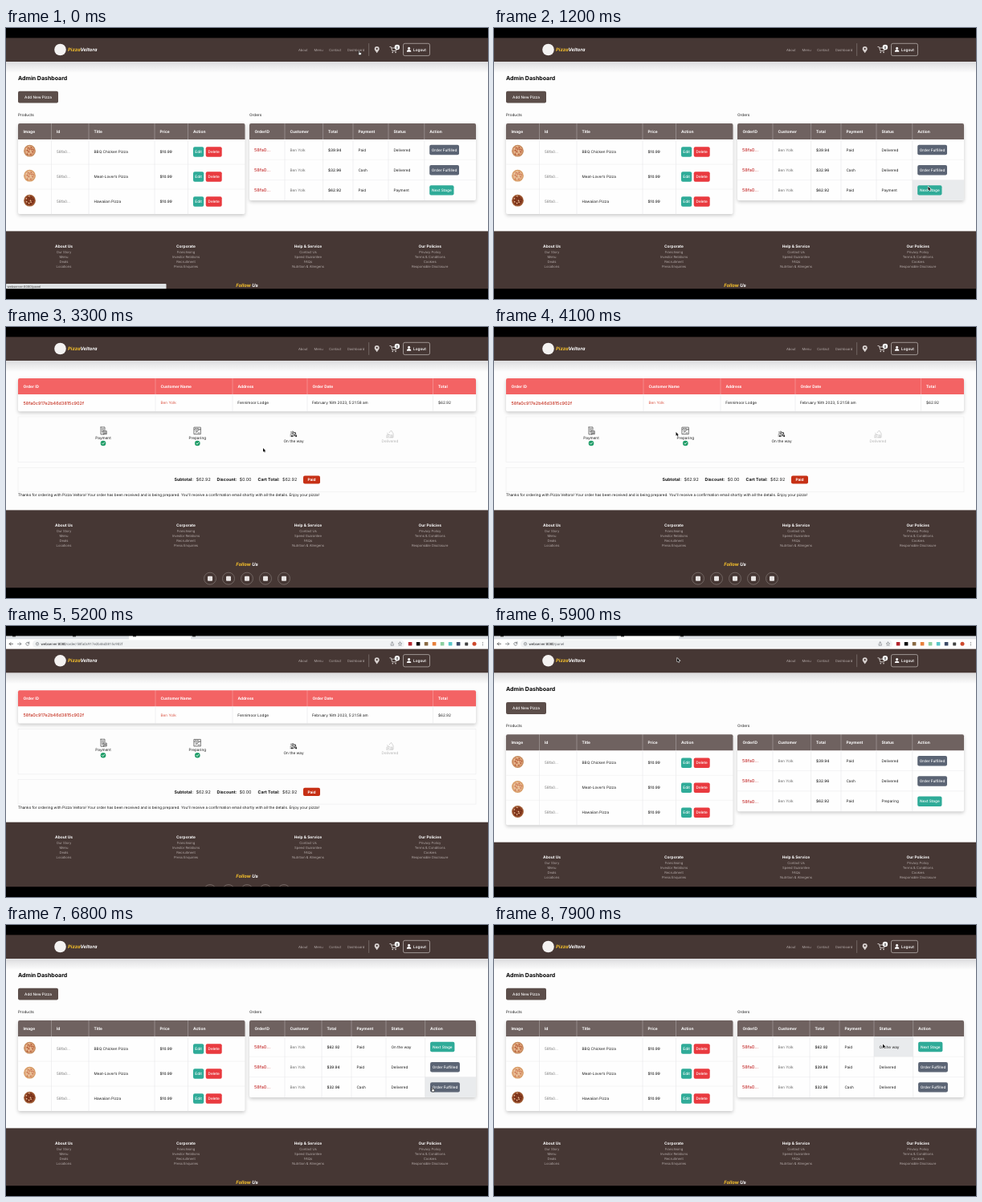
An HTML page that plays this animation: 600 px wide and 338 px high, repeating every 8 s.

```html
<!DOCTYPE html>
<html lang="en">
<head>
<meta charset="utf-8">
<title>Pizza admin</title>
<style>
  html, body { margin: 0; width: 100%; height: 100%; overflow: hidden; background: #000; }
  svg { display: block; width: 100vw; height: 100vh; font-family: Inter, sans-serif; text-rendering: geometricPrecision; }
  text { white-space: pre; }
  .shadow { filter: drop-shadow(0 2px 2px #0003); }
</style>
</head>
<body>
<svg id="stage" viewBox="0 0 600 338"></svg>
<script>
const LOOP = 8000, BAR = 16.3;
const BROWN = '#463734', GREEN = '#2fab98', RED = '#e93a3f', SLATE = '#5b6474', INK = '#1c1c1c';
const HOST = 'webserver:8080', TICKET = '58fa0c917e2b46d3815c902f', SHORT_ID = TICKET.slice(0, 5) + '...';
const GUEST = 'Ben Yolk';

const stage = document.getElementById('stage');

// Drawing helpers; text is placed by its vertical centre.
const text = (x, y, s, size = 4.7, fill = INK, weight = 400, anchor = 'start', extra = '') =>
  `<text x="${x}" y="${y + size * .36}" font-size="${size}" fill="${fill}" font-weight="${weight}" text-anchor="${anchor}" ${extra}>${s}</text>`;
const box = (x, y, w, h, fill, r = 0, extra = '') =>
  `<rect x="${x}" y="${y}" width="${w}" height="${h}" fill="${fill}" rx="${r}" ${extra}/>`;
const dot = (x, y, r, fill, extra = '') => `<circle cx="${x}" cy="${y}" r="${r}" fill="${fill}" ${extra}/>`;
const line = (d, color, width = .5, fill = 'none') =>
  `<path d="${d}" fill="${fill}" stroke="${color}" stroke-width="${width}" stroke-linecap="round" stroke-linejoin="round"/>`;
const move = (x, y, body, extra = '') => `<g transform="translate(${x} ${y})" ${extra}>${body}</g>`;
const button = (x, y, w, label, fill) =>
  box(x, y - 6.2, w, 12.4, fill, 2) + text(x + w / 2, y, label, 4.7, '#fff', 500, 'middle');

// Motion helpers
const ramp = (t, a, b) => {
  const u = Math.min(1, Math.max(0, (t - a) / (b - a)));
  return u * u * (3 - 2 * u);
};
const route = [
  [0, 439.6, 28.3], [200, 440, 30], [900, 548, 105], [1250, 540, 203], [1650, 538, 203], [2350, 509, 153],
  [2600, 509, 153], [2950, 322, 151], [3300, 320, 151], [3950, 226.5, 131], [4200, 226.5, 131],
  [4650, 228, 5], [5550, 228, 5], [5850, 228, 40], [6000, 228, 40], [6500, 530.6, 202.5],
  [7000, 530.6, 202.5], [7250, 511, 198], [7750, 484, 148.5], [LOOP, 484, 148.5]
];
function pointer(t) {
  const i = route.findIndex(k => k[0] > t);
  const [t0, x0, y0] = route[i - 1], [t1, x1, y1] = route[i];
  const u = ramp(t, t0, t1);
  return [x0 + (x1 - x0) * u, y0 + (y1 - y0) * u];
}

function header() {
  const nav = [[364, 'About'], [383.5, 'Menu'], [402, 'Contact'], [425, 'Dashboard']];
  return box(0, 42, 600, 14, 'url(#fade)') + box(0, 12, 600, 30, BROWN) +
    dot(67.5, 27, 7.3, '#f4f2f1') +
    text(77, 27, '<tspan fill="#f6c02c">Pizza</tspan>Veltora', 5.9, '#fff', 700, 'start', 'font-style="italic"') +
    nav.map(([x, s]) => text(x, 27, s, 4.2, '#d2cac8', 300)).join('') +
    line('M451.7 19.5V34.5', '#8f8582', .6) +
    '<path d="M461.7 31.3C459 27.5 458.7 27 458.7 25.9a3 3 0 0 1 6 0C464.7 27 464.4 27.5 461.7 31.3Z" fill="#d8d2d0"/>' +
    dot(461.7, 25.9, 1.1, BROWN) +
    line('M477.8 23.5h1.5l1.5 5h4.7l1-3.6h-6.4', '#e5e0de', .8) + dot(481.3, 30.4, .8, '#e5e0de') + dot(485, 30.4, .8, '#e5e0de') +
    dot(486.9, 24, 3.2, '#fff') + text(486.9, 24, '0', 4.3, '#222', 600, 'middle') +
    box(494.5, 19.3, 33, 15.3, 'none', 2, 'stroke="#d9d3d1" stroke-width=".6"') +
    dot(501.6, 25.2, 1.5, '#fff') + '<path d="M498.9 29.8a2.7 2.7 0 0 1 5.4 0Z" fill="#fff"/>' +
    text(507, 27, 'Logout', 4.7, '#fff', 600);
}

function footer(top) {
  const columns = [
    [72, 'About Us', 'Our Story', 'Menu', 'Deals', 'Locations'],
    [224, 'Corporate', 'Franchising', 'Investor Relations', 'Recruitment', 'Press Enquiries'],
    [376, 'Help &amp; Service', 'Contact Us', 'Speed Guarantee', 'FAQs', 'Nutrition &amp; Allergens'],
    [527.7, 'Our Policies', 'Privacy Policy', 'Terms &amp; Conditions', 'Cookies', 'Responsible Disclosure']
  ];
  const lists = columns.map(([x, title, ...items]) =>
    text(x, 18.7, title, 4.85, '#fff', 700, 'middle') +
    items.map((s, i) => text(x, 25.6 + 6.2 * i, s, 4.2, '#d2cac8', 300, 'middle')).join('')).join('');
  const social = [254, 277, 300, 323, 346].map(x =>
    dot(x, 85.3, 7.5, 'none', 'stroke="#8d8380" stroke-width=".6"') + box(x - 3, 82.3, 6, 6, '#e8e4e3', 1)).join('');
  return move(0, top, box(0, 0, 600, 120, BROWN) + lists +
    text(300, 67, '<tspan fill="#f6c02c">Follow</tspan> Us', 5.9, '#fff', 700, 'middle', 'font-style="italic"') + social);
}

// Table frame: edges lists every column border from left to right.
function grid(edges, top, head, rows, rowH, color, titles, hover) {
  const left = edges[0], right = edges[edges.length - 1], bottom = top + head + rows * rowH;
  let out = box(left, top, right - left, bottom - top, '#fefefe', 2, 'class="shadow"') +
    `<path d="M${left} ${top + head}V${top + 2}q0-2 2-2H${right - 2}q2 0 2 2V${top + head}Z" fill="${color}"/>`;
  if (hover) {
    const c = edges.findIndex((x, i) => hover[0] >= x && hover[0] < edges[i + 1]);
    const r = Math.floor((hover[1] - top - head) / rowH);
    if (c >= 0 && r >= 0 && r < rows) out += box(edges[c], top + head + r * rowH, edges[c + 1] - edges[c], rowH, '#e9ebed');
  }
  for (let r = 1; r < rows; r++) out += line(`M${left} ${top + head + r * rowH}H${right}`, '#e4e4e6', .4);
  edges.slice(1, -1).forEach(x => {
    out += line(`M${x} ${top}V${top + head}`, '#ffffff80', .5) + line(`M${x} ${top + head}V${bottom}`, '#e2e2e4', .5);
  });
  return out + titles.map((s, i) => text(edges[i] + 6.4, top + head / 2, s, 4.9, '#fff', 700)).join('');
}

function pizza(x, y, crust, sauce, topping) {
  let out = dot(x, y, 7.4, crust) + dot(x, y, 6.2, sauce);
  for (let i = 0; i < 16; i++) {
    const r = 5.5 * Math.sqrt((i + .5) / 16), a = i * 2.4;
    out += dot(x + r * Math.cos(a), y + r * Math.sin(a), .75, i % 3 ? topping : '#f0d3ae');
  }
  return out;
}

function products(mouse) {
  const edges = [15, 56.5, 103, 185, 226.5, 297.5];
  const items = [
    ['BBQ Chicken Pizza', '#c48a5c', '#d99a70', '#a5482c'],
    ['Meat-Lover’s Pizza', '#d79a62', '#e2ad83', '#c4684a'],
    ['Hawaiian Pizza', '#a3623a', '#8c3f22', '#5f2413']
  ];
  return grid(edges, 119, 20, 3, 31, '#6f6260', ['Image', 'Id', 'Title', 'Price', 'Action'], mouse) +
    items.map(([name, ...tones], i) => {
      const y = 154.5 + 31 * i;
      return pizza(29.5, y - 1.3, ...tones) + text(63, y, SHORT_ID, 4.7, '#777') + text(109.5, y, name) +
        text(191.5, y, '$10.99', 4.7, INK, 500) + button(233, y, 13.2, 'Edit', GREEN) + button(248.7, y, 20, 'Delete', RED);
    }).join('');
}

function orders(t, mouse) {
  const onWay = t >= 6600;
  const edges = onWay ? [303, 347, 393, 430, 473, 521.7, 585] : [303, 347, 394.6, 432, 476, 520.8, 585];
  const done = [['$39.94', 'Paid', 'Delivered'], ['$32.96', 'Cash', 'Delivered']];
  const open = ['$62.92', 'Paid', onWay ? 'On the way' : t < 1500 ? 'Payment' : 'Preparing'];
  const moved = onWay || t >= 1500 && t < 5000;
  const list = moved ? [open, ...done] : [...done, open];
  return grid(edges, 119, 20, 3, 25.3, '#6f6260', ['OrderID', 'Customer', 'Total', 'Payment', 'Status', 'Action'], mouse) +
    list.map((order, i) => {
      const y = 152 + 25.2 * i, x = edges.map(e => e + 6.4);
      return text(309, y, SHORT_ID, 5.47, '#c53030', 500) + text(x[1], y, GUEST, 4.7, '#6d6d6d') +
        order.map((s, c) => text(x[c + 2], y, s, 4.7, INK, c ? 400 : 500)).join('') +
        (order === open ? button(x[5], y, 30.3, 'Next Stage', GREEN) : button(x[5], y, 36.8, 'Order Fulfilled', SLATE));
    }).join('');
}

const adminPage = (t, mouse) =>
  text(15, 62.4, 'Admin Dashboard', 7.03, '#000', 700) +
  box(15, 78.8, 50, 14.8, '#5c4e4a', 2) + text(40, 86.2, 'Add New Pizza', 4.7, '#fff', 500, 'middle') +
  text(15, 108.5, 'Products') + text(303, 108.5, 'Orders') +
  products(mouse) + orders(t, mouse) + footer(253.4);

const check = x => dot(x, 145, 3.3, '#1f9d68') + line(`M${x - 1.5} 145l1.1 1.2 2-2.3`, '#fff', .8);

function stages() {
  const bill = 'M-3-4.5h5v3.5M-3-4.5v9h4M-1.7-2.5h2.5M-1.7-.6h2.5M-1.7 1.3h1.5M.5.3h3.7v4H.5ZM1.4 1.6h2M1.4 3h2';
  const cook = 'M-4-4.3h8v8.6h-8ZM-4-1.6h8M-2.5-3h1M0-3h1M-2.2 2.8l4.2-4.2M-2.5.4h2M.6 2.6h2';
  const ride = 'M-4 2.5h1M-1 2.5h2.2l1-4.2h-1.4M-4 .3q2-1.4 4 0l.8 1.4M-3.5-2.3h2.7v2.3M2.2-1.7l1 3.4M-1-3.4l1.5 1.7';
  const door = 'M-4 4.4h8V-.6L1.5-4.4-1-1.6M-4 4.4V1.2h4M-2.7 2.8h1.6M1 4.4V1.4h1.7v3M-3.5-1l2 1.7';
  return move(121, 129.4, line(bill, '#222', .6)) + text(121, 138, 'Payment', 4.7, INK, 400, 'middle') + check(121) +
    move(238.3, 129.4, line(cook, '#222', .6)) + text(238.3, 138, 'Preparing', 4.7, INK, 400, 'middle') + check(238.3) +
    move(358, 133.4, line(ride, '#222', .7) + dot(-2, 2.6, 1.1, '#222') + dot(3.1, 2.6, 1.1, '#222')) +
    text(358, 142, 'On the way', 4.7, INK, 400, 'middle') +
    move(478, 133.4, line(door, '#bbb', .6)) + text(478, 142, 'Delivered', 4.7, '#b5b5b5', 400, 'middle');
}

function orderPage(mouse) {
  const frame = 'stroke="#e9e9eb" stroke-width=".5"';
  return grid([15, 186, 282, 375, 531.5, 585], 64, 20, 1, 21.3, '#f36364',
      ['Order ID', 'Customer Name', 'Address', 'Order Date', 'Total'], mouse) +
    text(21.5, 94.7, TICKET, 5.47, '#c53020', 500) + text(192.5, 94.7, GUEST, 4.7, '#dc5746') +
    text(288.3, 94.7, 'Fennimoor Lodge') + text(381, 94.7, 'February 16th 2023, 5:21:58 am') + text(538, 94.7, '$62.92') +
    box(15, 112, 570, 56.6, '#fdfdfd', 0, frame) + stages() +
    box(15, 175.4, 570, 30.4, '#fdfdfd', 0, frame) +
    [[209.5, 'Subtotal:', 236.5, '$62.92'], [262.6, 'Discount:', 290.5, '$0.00'], [313.6, 'Cart Total:', 344, '$62.92']]
      .map(([x, label, x2, sum]) => text(x, 190.5, label, 5.3, '#111', 700) + text(x2, 190.5, sum, 5.4)).join('') +
    box(370, 185.4, 21, 10.2, '#c63015', 2) + text(380.5, 190.5, 'Paid', 4.8, '#fff', 700, 'middle') +
    text(15, 209.7, 'Thanks for ordering with Pizza Veltora! Your order has been received and is being prepared. ' +
      'You’ll receive a confirmation email shortly with all the details. Enjoy your pizza!', 4.65, '#111') +
    footer(228.4);
}

function toolbar(path) {
  const gray = '#5f6368';
  const addons = ['#b3262e', '#111', '#8b6b45', '#e8803c', '#8ccfa0', '#58c6c9', '#3c4a66'];
  return box(0, 12, 600, 16.5, '#fff') + box(0, 12, 600, 4.4, '#dee1e6') + box(153, 12, 77, 5, '#fff') +
    [8, 83, 158, 232].map(x => box(x, 12, 4, 1.4, '#444')).join('') +
    box(33, 17.6, 463, 9.6, '#f1f3f4', 4.8) +
    line('M8.5 22.3H4.3M6 20.5l-1.8 1.8L6 24.1', '#333', .7) + line('M14.5 22.3h4.2M17 20.5l1.8 1.8L17 24.1', gray, .7) +
    line('M28.6 21.2a2 2 0 1 0 .2 1.6M28.8 19.8v1.6h-1.6', gray, .7) +
    dot(39, 22.3, 1.8, 'none', `stroke="${gray}" stroke-width=".5"`) + line('M39 22.2v.9M39 21.2v.1', gray) +
    text(43.5, 22.3, `${HOST}<tspan fill="${gray}">${path}</tspan>`, 4.4, '#202124', 400, 'start', 'font-family="Roboto, sans-serif"') +
    line('M479 22v2.3h3.4V22M480.7 23v-3M479.7 20.8l1-1 1 1', gray) +
    line('M490.5 20l.7 1.5 1.6.2-1.2 1.1.3 1.6-1.4-.8-1.4.8.3-1.6-1.2-1.1 1.6-.2Z', gray) +
    addons.map((c, i) => box(500.8 + 10 * i, 20, 4.6, 4.6, c, .6)).join('') +
    box(571.2, 20.4, 4, 4, '#444', .6) + dot(583, 22.3, 2.5, '#cf4a2e') +
    [20.5, 22.3, 24.1].map(y => dot(593.5, y, .5, gray)).join('');
}

function cursor([x, y], hand) {
  return move(x, y, hand
    ? line('M-.6 .4q.6-.8 1.1 0V2l2 .5q.6.3.4 1.2L2.4 5.4H-.1L-1.6 3.3q-.1-.8 1 0Z', '#111', .6, '#fff')
    : line('M0 0V4.7L1.1 3.7 1.9 5.4 2.7 5 2 3.4H3.4Z', '#fff', .9, '#fff') + '<path d="M0 0V4.7L1.1 3.7 1.9 5.4 2.7 5 2 3.4H3.4Z" fill="#111"/>');
}

function scene(t) {
  const drop = BAR * (ramp(t, 4650, 4850) - ramp(t, 5950, 6150));
  const onOrder = t >= 3250 && t < 5500;
  const at = pointer(t), [x, y] = [at[0], at[1] - drop];
  const inRow = Math.abs((y - 151.6) % 25.3) < 6.5 && y > 145 && y < 209;
  const hand = y > 20 && y < 34 && x > 424 && x < 448 ||
    !onOrder && inRow && (x > 527 && x < 564 || x > 308 && x < 332);
  return `<defs><linearGradient id="fade" x2="0" y2="1"><stop stop-color="#dcdcde"/><stop offset="1" stop-color="#fdfdfd"/></linearGradient></defs>` +
    box(0, 12, 600, 314, '#fdfdfd') +
    move(0, drop, header() + (onOrder ? orderPage([x, y]) : adminPage(t, [x, y]))) +
    (drop > 0 ? move(0, drop - BAR, toolbar(onOrder ? '/order/' + TICKET : '/panel')) : '') +
    (t < 300 ? box(0, 319, 199.5, 7, '#dfe2e4', .8) + text(1.5, 322.2, HOST + '/panel', 3.9, '#444') : '') +
    cursor(at, hand) +
    box(0, 0, 600, 12.4, '#000') + box(0, 325.2, 600, 13, '#000');
}

let shown = '';
function frame() {
  const next = scene(performance.now() % LOOP);
  if (next !== shown) stage.innerHTML = shown = next;
  requestAnimationFrame(frame);
}
frame();
</script>
</body>
</html>
```
